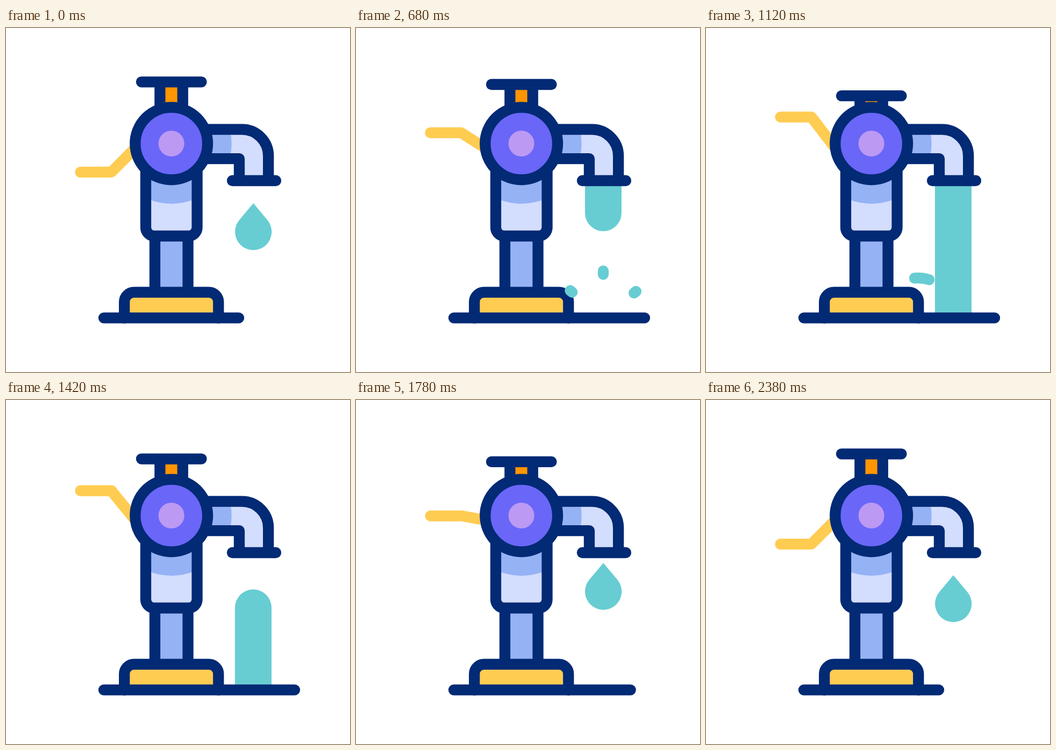
These frames come from a looping animation (640 px wide and 640 px high, 2400 ms). An HTML page:

```html
<!DOCTYPE html>
<html lang="en">
<head>
<meta charset="utf-8">
<title>Water pump</title>
<style>
  html, body { margin: 0; width: 100%; height: 100%; overflow: hidden; background: #fff; }
  svg { display: block; width: 100%; height: 100%; }
  .line { fill: none; stroke: #022a75; stroke-width: 20.3; stroke-linecap: round; stroke-linejoin: round; }
  .butt { stroke-linecap: butt; }
  .water { fill: #67cdd2; }
  .jet, .spray { fill: none; stroke: #67cdd2; stroke-linecap: round; }
  .jet { stroke-width: 68; }
  .spray { stroke-width: 20.3; }
  .light { fill: #d3ddfd; }
  .blue { fill: #95b2f5; }
  .yellow { fill: #ffcc52; }
</style>
</head>
<body>
<svg viewBox="0 0 640 640">
  <defs>
    <clipPath id="air"><rect x="400" y="284" width="120" height="253"/></clipPath>
    <clipPath id="shade"><circle cx="307.7" cy="215" r="112"/></clipPath>
    <path id="barrel" d="M260 240V371a16 16 0 0 0 16 16H339.6a16 16 0 0 0 16 -16V240"/>
    <path id="spout" d="M360 188.7H439A49.2 49.2 0 0 1 488.2 238V284H434V243.2H360"/>
  </defs>

  <g clip-path="url(#air)">
    <path id="drop" class="water" d="M0 0L26.1 31.2A34.1 34.1 0 1 1 -26.1 31.2Z"/>
    <path id="jet" class="jet"/>
  </g>

  <path id="handle" fill="none" stroke="#ffcc52" stroke-width="20.3" stroke-linecap="round" stroke-linejoin="round"/>

  <g id="plunger">
    <rect x="286" y="100" width="43" height="80" fill="#ff9500"/>
    <path class="line butt" d="M286.4 100V170M328.8 100V170"/>
    <path class="line" d="M252 100.3H363.5"/>
  </g>

  <rect class="blue" x="277" y="380" width="61.6" height="112"/>
  <path class="line butt" d="M277 385V495M338.6 385V495"/>

  <use href="#barrel" class="light"/>
  <use href="#barrel" class="blue" clip-path="url(#shade)"/>
  <use href="#barrel" class="line"/>

  <use href="#spout" class="light"/>
  <use href="#spout" class="blue" clip-path="url(#shade)"/>
  <path class="line butt" d="M360 188.7H439A49.2 49.2 0 0 1 488.2 238V284M360 243.2H434V284"/>
  <path class="line" d="M421 284H502"/>

  <circle class="line" cx="307.7" cy="215" r="67.4" style="fill:#6a66f8"/>
  <circle cx="307.7" cy="215" r="24" fill="#bc9af3"/>

  <path class="line yellow" style="fill:#ffcc52" d="M220.2 539.5V509.6a18 18 0 0 1 18 -18H377.3a18 18 0 0 1 18 18V539.5"/>

  <g id="sprays"></g>
  <path id="ground" class="line"/>
</svg>
<script>
const LOOP = 2400, STROKE = 394, SWING = 1190;
const el = id => document.getElementById(id);
const unit = x => Math.min(1, Math.max(0, x));
const span = (t, start, length) => unit((t - start) / length);
const mix = (a, b, k) => a + (b - a) * k;
const sine = x => (1 - Math.cos(Math.PI * x)) / 2;

// Symmetric cubic ease with horizontal handles of length a
function steep(x, a) {
  let lo = 0, hi = 1;
  for (let i = 0; i < 24; i++) {
    const s = (lo + hi) / 2, r = 1 - s;
    if (3 * r * r * s * a + 3 * r * s * s * (1 - a) + s * s * s < x) lo = s; else hi = s;
  }
  return lo * lo * (3 - 2 * lo);
}

// Each spray: path, start, travel time, lag of its tail
const sprays = [
  ["M437 521L398.5 488.5", 430, 170, 97],
  ["M460 519V452", 430, 170, 97],
  ["M482 523L521 490", 430, 170, 97],
  ["M442 490Q418 454 366 470", 944, 240, 78]
].map(([d, start, time, lag]) => {
  const path = document.createElementNS("http://www.w3.org/2000/svg", "path");
  path.setAttribute("class", "spray");
  path.setAttribute("d", d);
  el("sprays").append(path);
  return { path, start, time, lag, size: path.getTotalLength() };
});

function drawSpray(s, t) {
  const head = span(t, s.start, s.time) * s.size;
  const tail = span(t, s.start + s.lag, s.time) * s.size;
  const on = head - tail > 0.01;
  s.path.style.display = on ? "" : "none";
  if (!on) return;
  s.path.setAttribute("stroke-dasharray", `${head - tail} ${s.size * 3}`);
  s.path.setAttribute("stroke-dashoffset", -tail);
}

function draw(t) {
  const push = t < 6 * STROKE ? sine(t / STROKE) : 0;
  el("plunger").setAttribute("transform", `translate(0 ${27.5 * push})`);

  const lift = steep(unit(1 - Math.abs(t / SWING - 1)), 0.7);
  const y = mix(268.2, 165.3, lift);
  el("handle").setAttribute("d", `M138.5 ${y}H196L240.5 223.5`);

  const reach = sine(span(t, 0, 510)) - sine(span(t, 1610, 510));
  el("ground").setAttribute("d", `M182 539.4H${mix(433, 537, reach)}`);

  let tip = 326 + 154 * (t / 360) ** 2;
  if (t > 1600) tip = mix(326, 205, (1 - span(t, 1600, 320)) ** 2);
  else if (t > 500) tip = 700;
  el("drop").setAttribute("transform", `translate(460.2 ${tip})`);

  const head = mix(250, 580, sine(span(t, 552, 360)));
  const tail = mix(250, 580, sine(span(t, 1261, 360)));
  el("jet").setAttribute("d", head - tail > 0.01 ? `M460 ${tail}V${head}` : "");

  sprays.forEach(s => drawSpray(s, t));
}

const begin = performance.now();
function tick() {
  draw((performance.now() - begin) % LOOP);
  requestAnimationFrame(tick);
}
draw(0);
requestAnimationFrame(tick);
</script>
</body>
</html>
```
